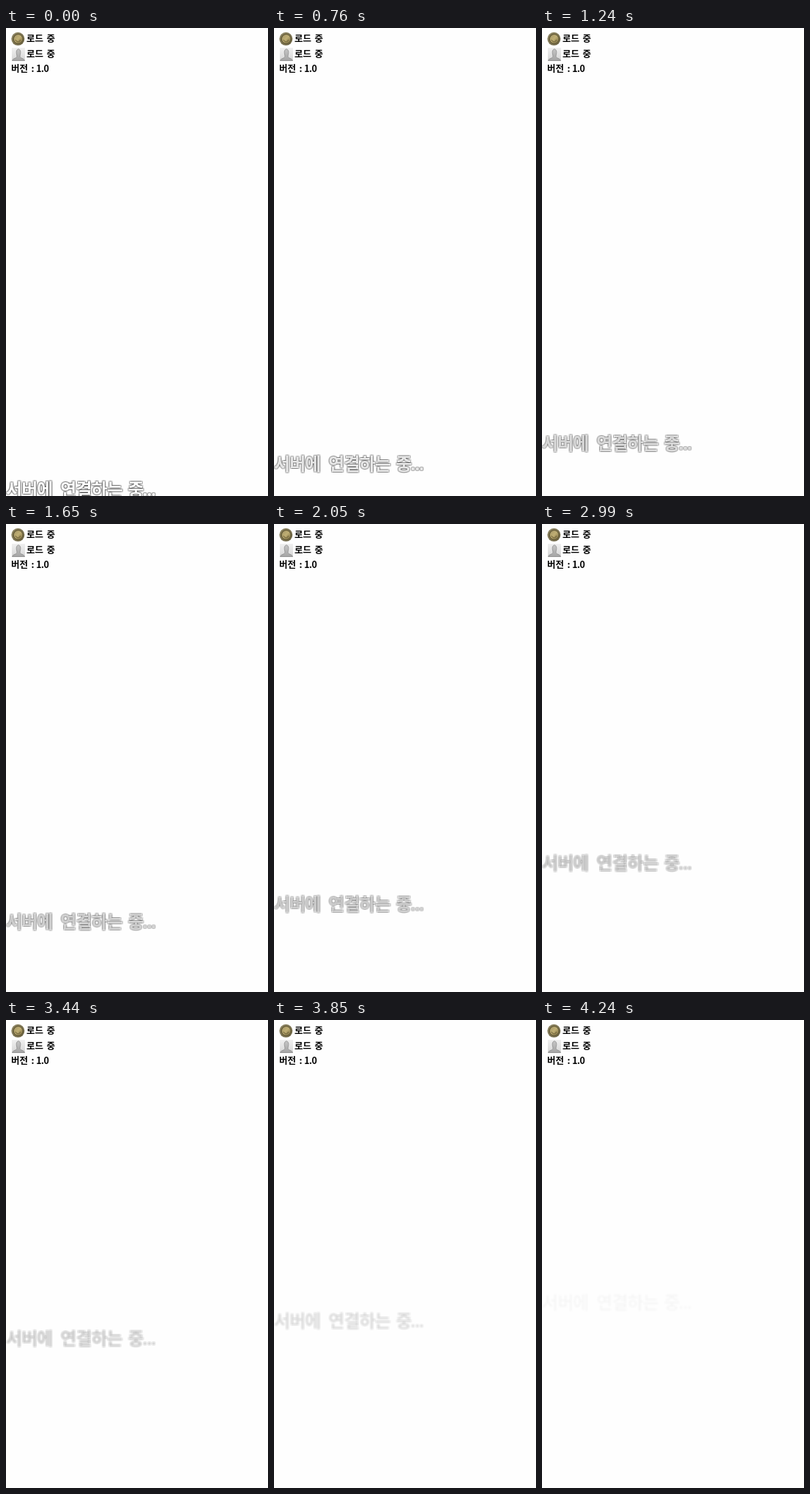
Write an HTML page with a canvas that moves like this. It is 358 px wide and 638 px high and loops after 4.73 s.

```html
<!DOCTYPE html>
<html lang="ko">
<head>
<meta charset="utf-8">
<style>
html, body { margin: 0; width: 100%; height: 100%; overflow: hidden; background: #fefefe; }
canvas { display: block; }
</style>
</head>
<body>
<canvas id="stage" width="358" height="638"></canvas>
<script>
const ctx = document.getElementById('stage').getContext('2d');
const LOOP = 4730;
const FAMILY = '"Noto Sans CJK KR", "Noto Sans CJK", "Noto Sans KR", sans-serif';

// Start time of each run of steps, and the number of steps in it
const RUNS = [[170, 9], [700, 9], [1240, 10], [1820, 10], [2400, 9], [2930, 10], [3500, 10], [4070, 3]];
const END = 4240;
const STEPS = 71;

function stepAt(t) {
  if (t >= END) return STEPS;
  t += 5;
  let done = 0;
  for (let i = 0; i < RUNS.length; i++) {
    const [start, count] = RUNS[i];
    const next = i + 1 < RUNS.length ? RUNS[i + 1][0] : END;
    if (t < start) return done;
    if (t < next) return done + 1 + Math.floor((t - start) / (next - start) * count);
    done += count;
  }
  return STEPS;
}

function setFont(size, spacing = 0) {
  ctx.font = `900 ${size}px ${FAMILY}`;
  ctx.letterSpacing = spacing + 'px';
}

function words(list, y, dx = 0) {
  for (const [text, x] of list) ctx.fillText(text, x + dx, y);
}

function disc(x, y, r, fill) {
  ctx.fillStyle = fill;
  ctx.beginPath();
  ctx.arc(x, y, r, 0, Math.PI * 2);
  ctx.fill();
}

function gradient(x0, y0, x1, y1, ...colors) {
  const g = ctx.createLinearGradient(x0, y0, x1, y1);
  colors.forEach((c, i) => g.addColorStop(i / (colors.length - 1), c));
  return g;
}

function drawCoin(x, y) {
  disc(x, y, 9, gradient(x - 7, y - 7, x + 7, y + 7, '#8f8766', '#7d7452', '#69603f'));
  disc(x, y, 6.8, '#625834');
  disc(x + 0.3, y, 5.8, gradient(x - 5, y - 5, x + 5, y + 5, '#a89a68', '#bfae74', '#8b7c4b'));
  ctx.strokeStyle = '#776a40';
  ctx.lineWidth = 1.2;
  ctx.beginPath();
  ctx.arc(x, y + 0.5, 3.4, 0.2, Math.PI - 0.2);
  ctx.stroke();
}

function drawUser(x, y) {
  ctx.fillStyle = gradient(x, y, x, y + 18, '#f0f0f0', '#d6d6d6');
  ctx.fillRect(x, y, 18, 18);
  ctx.fillStyle = gradient(x, y, x, y + 18, '#c8c8c8', '#a4a4a4');
  ctx.strokeStyle = '#8e8e8e';
  ctx.lineWidth = 0.8;
  ctx.beginPath();
  ctx.moveTo(x + 0.5, y + 17.5);
  ctx.quadraticCurveTo(x + 1, y + 15, x + 5, y + 14);
  ctx.quadraticCurveTo(x + 8, y + 13, x + 6.8, y + 10);
  ctx.bezierCurveTo(x + 3.5, y - 1, x + 14.5, y - 1, x + 11.2, y + 10);
  ctx.quadraticCurveTo(x + 10, y + 13, x + 13, y + 14);
  ctx.quadraticCurveTo(x + 17, y + 15, x + 17.5, y + 17.5);
  ctx.closePath();
  ctx.fill();
  ctx.stroke();
}

function drawHeader() {
  drawCoin(16.3, 14.8);
  drawUser(8, 27);
  ctx.fillStyle = '#000';
  setFont(12.5);
  const loading = [['로드', 28], ['중', 55.5]];
  words(loading, 18.5);
  words(loading, 39.5);
  words([['버전', 7], [':', 34.5]], 59.7);
  setFont(12.5, -0.6);
  words([['1.0', 41.3]], 59.7);
}

function statusText(y, dx = 0) {
  setFont(24, -0.9);
  words([['서버에', 0], ['연결하는', 74.3], ['중', 166.5]], y, dx);
  setFont(21, -0.9);
  words([['...', 186.5]], y, dx);
}

// White text over four dark offset copies, all fading together
function drawStatus(step) {
  const alpha = 1 - step / 73;
  const y = Math.min(630, 632.9 - 3.477 * step) + 8.4;
  ctx.fillStyle = '#000';
  ctx.globalAlpha = alpha * 0.33;
  for (const dx of [-1, 1]) {
    for (const dy of [-1, 1]) statusText(y + dy, dx);
  }
  ctx.fillStyle = '#fff';
  ctx.globalAlpha = alpha;
  statusText(y);
  ctx.globalAlpha = 1;
}

function frame() {
  ctx.fillStyle = '#fefefe';
  ctx.fillRect(0, 0, 358, 638);
  drawHeader();
  drawStatus(stepAt((performance.now() - begin) % LOOP));
  requestAnimationFrame(frame);
}

const begin = performance.now();
frame();
</script>
</body>
</html>
```
